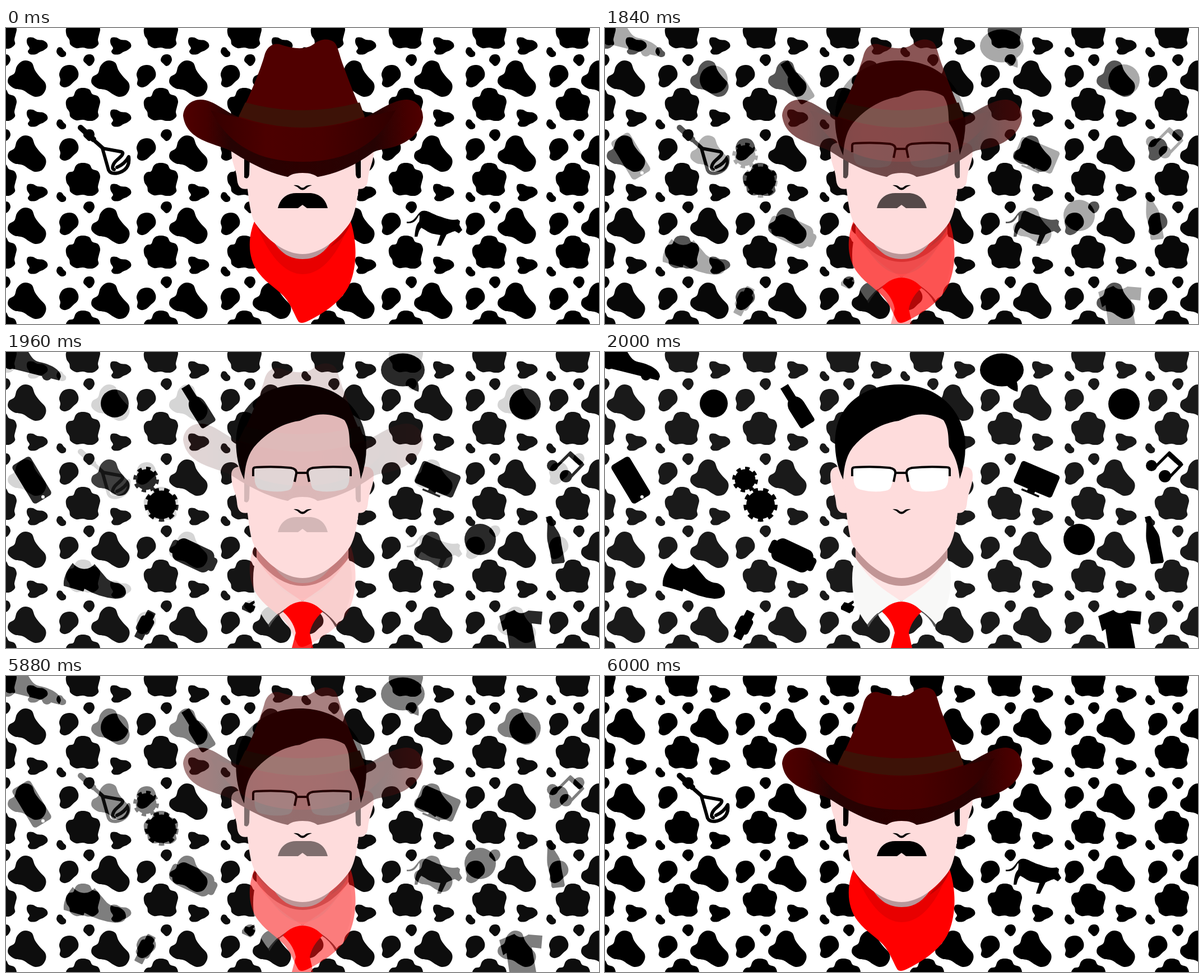
Recreate the animation shown at these times as an HTML page. Size 1058 px wide and 529 px high, loop 6100 ms.

```html
<!DOCTYPE html>
<html lang="en">
<head>
<meta charset="utf-8">
<title>Cowboy and clerk</title>
<style>
  html, body { margin: 0; width: 100%; height: 100%; overflow: hidden; background: #fff; }
  svg { display: block; width: 100%; height: 100%; }
</style>
</head>
<body>
<svg viewBox="0 0 1058 529" preserveAspectRatio="none">
  <defs>
    <linearGradient id="brim" gradientUnits="userSpaceOnUse" x1="316" x2="744" y1="150" y2="150">
      <stop offset="0" stop-color="#500000"/>
      <stop offset=".1" stop-color="#430000"/>
      <stop offset=".2" stop-color="#260303"/>
      <stop offset=".5" stop-color="#2c0000"/>
      <stop offset=".8" stop-color="#260303"/>
      <stop offset=".93" stop-color="#450000"/>
      <stop offset="1" stop-color="#500000"/>
    </linearGradient>
    <linearGradient id="front" gradientUnits="userSpaceOnUse" x1="365" x2="695" y1="190" y2="190">
      <stop offset="0" stop-color="#350000"/>
      <stop offset=".3" stop-color="#4c0000"/>
      <stop offset=".6" stop-color="#480000"/>
      <stop offset="1" stop-color="#300000"/>
    </linearGradient>

    <path id="ear" d="M430,206C410,202 402,208 402,220C402,240 410,250 412,268C413,285 420,290 434,287z"/>
    <path id="sideburn" d="M425,228V267Q432,272 434,262L435,228z"/>
    <g id="face">
      <g fill="#fedcdc">
        <use href="#ear"/>
        <use href="#ear" transform="matrix(-1 0 0 1 1058 0)"/>
        <path d="M428,190C430,130 470,95 530,95C595,95 630,130 631,190L630,280C626,312 622,338 611,352C590,380 560,404 529,404C498,404 468,380 447,352C436,338 434,312 430,280z"/>
      </g>
    </g>
    <path id="nostrils" d="M513,281Q521,280 525,284Q529,287 533,284Q537,280 546,281Q539,283 535,287Q529,292 523,287Q519,283 513,281z"/>
    <g id="lens">
      <path fill="#fff" d="M442,208Q480,205 510,208Q518,211 516,220L511,239Q509,247 500,248Q480,252 456,246Q446,244 444,232z"/>
      <path fill="none" stroke="#000" stroke-width="4" d="M441,222V210Q441,206 446,206Q480,204 508,207Q519,209 518,217L515,232"/>
    </g>
  </defs>

  <g id="cowboy">
    <rect width="1058" height="529" fill="#fff"/>
    <g class="spots"></g>

    <!-- branding iron -->
    <g fill="none" stroke="#000" stroke-linecap="round" stroke-linejoin="round">
      <path stroke-width="10" d="M133,178L156,199"/>
      <path stroke-width="7" d="M154,198L172,214"/>
      <path stroke-width="6" d="M172,215L183,254Q187,262 200,259Q222,253 219,230Q212,243 198,249M172,215L205,221C213,223 205,230 198,236C190,243 188,252 193,253"/>
    </g>
    <!-- cow -->
    <path d="M715,346C730,348 732,332 742,327C752,324 760,333 775,337C788,342 798,344 806,342L810,345L809,352L814,361L808,367L801,363C797,364 790,367 786,369L776,389L769,389L775,370C765,369 755,367 748,361L741,357C736,362 736,368 734,373L729,373C730,362 731,352 737,346C738,340 738,335 737,334C732,344 728,350 715,349z"/>

    <!-- bandanna -->
    <path fill="#f00" d="M443,346C431,376 431,412 451,438C466,458 488,468 501,486C512,502 516,516 522,525Q527,530 540,523C574,506 602,485 614,456C625,428 628,388 615,346z"/>
    <path fill="#e80000" d="M447,352C466,400 494,440 529,440C566,440 594,400 612,350z"/>
    <path fill="#c40000" d="M443,346L447,352Q462,374 482,388L476,382Q455,372 443,346zM615,346Q609,373 578,392L590,377Q606,360 615,346z"/>
    <path fill="#b8989b" d="M475,378C488,400 504,413 529,413C554,413 570,400 583,378z"/>
    <use href="#face"/>
    <use href="#sideburn"/>
    <use href="#sideburn" transform="matrix(-1 0 0 1 1058 0)"/>
    <path d="M485,322C489,304 502,295 518,295H541C557,295 570,304 574,322H537L529,316L521,322z"/>

    <!-- hat -->
    <path fill="url(#brim)" d="M316,157C317,140 330,128 347,128C372,128 392,152 418,160H640C662,150 690,128 715,128C732,128 744,142 744,160C742,183 722,204 690,213C672,218 664,217 655,222C630,241 596,259 557,266H502C468,259 432,240 403,221C378,206 322,204 316,157z"/>
    <path fill="url(#front)" d="M365,147C398,210 450,239 529,239C610,239 664,207 695,147Q665,154 640,160L529,176L418,160Q394,157 365,147z"/>
    <path fill="#500000" d="M415,160C431,130 455,74 462,46C468,30 480,26 491,30C512,37 535,40 550,28C561,19 576,18 585,25C593,32 594,49 604,73C616,106 628,136 640,160Q529,197 415,160z"/>
    <path fill="#3d1207" d="M427,133Q529,161 631,133L640,158Q529,198 415,158z"/>
    <path fill="#fedcdc" d="M500,269C506,262 515,259 529,259C543,259 552,262 559,269z"/>
    <use href="#nostrils"/>
  </g>

  <g id="clerk" opacity="0">
    <rect width="1058" height="529" fill="#fff"/>
    <g class="spots" fill="#1a1a1a"></g>

    <!-- car, bottle, speech bubble, plain badges -->
    <path d="M0,0H40C46,10 50,16 60,18C80,22 98,32 98,44L95,51L60,42L0,27z"/>
    <circle cx="73" cy="42" r="9"/>
    <circle cx="7" cy="21" r="10"/>
    <circle cx="194" cy="92" r="25"/>
    <circle cx="926" cy="93" r="28"/>
    <circle cx="846" cy="335" r="28"/>
    <path transform="translate(342 97) rotate(-32)" d="M-8,-42H8V-16Q15,-10 15,0V34Q15,39 10,39H-10Q-15,39 -15,34V0Q-15,-10 -8,-16z"/>
    <ellipse cx="708" cy="32" rx="39" ry="29.5"/>
    <path d="M715,58Q724,68 736,71Q738,62 733,48z"/>

    <!-- phone, gears, headset -->
    <rect x="-19" y="-40" width="38" height="80" rx="6" transform="translate(46 229) rotate(-31)"/>
    <circle cx="66" cy="259" r="3" fill="#fff"/>
    <g stroke="#000">
      <circle cx="250" cy="228" r="18.5" stroke-width="9" pathLength="16" stroke-dasharray="1"/>
      <circle cx="277.5" cy="273" r="25.5" stroke-width="10" pathLength="18" stroke-dasharray="1"/>
    </g>
    <g transform="translate(334 364) rotate(25)">
      <rect x="-36" y="-22" width="72" height="43" rx="13"/>
      <rect x="-44" y="-13" width="88" height="25" rx="6"/>
    </g>

    <!-- shoe, watch, screen -->
    <path d="M119,377C130,391 148,391 158,379L180,405Q188,412 200,413Q214,418 214,430Q213,441 195,441Q165,438 140,423L138,428L103,418Q101,400 119,377z"/>
    <g transform="translate(248 488) rotate(27)">
      <rect x="-8" y="-27" width="16" height="54" rx="2"/>
      <rect x="-13" y="-15" width="26" height="30" rx="6"/>
    </g>
    <g transform="translate(770 228) rotate(23)">
      <rect x="-37" y="-22" width="74" height="43" rx="5"/>
      <rect x="-18" y="24.5" width="34" height="3.5" rx="1"/>
      <rect x="-8" y="20" width="14" height="5"/>
    </g>

    <!-- notes, bottle, thumb, shirt -->
    <circle cx="975" cy="203" r="10"/>
    <circle cx="999" cy="222" r="11"/>
    <g fill="none" stroke="#000" stroke-linejoin="round">
      <path stroke-width="5" d="M981,206L1007,180L1029,201L1005,226"/>
      <path stroke-width="9" d="M1006,182L1027,201"/>
    </g>
    <path d="M963,295L973,293L976,306C980,316 989,323 990,335C991,348 995,360 997,374L995,377L975,379L973,376C973,362 969,354 967,342C964,332 966,317 966,306z"/>
    <path d="M421,455L427,447L434,449L443,444L444,448L440,452L445,455L442,463L436,467L421,460z"/>
    <path d="M880,472L907,461Q918,472 932,462L957,464L955,487L938,485L946,529H898L893,495L887,499z"/>

    <!-- neck, collar, tie -->
    <path fill="#fee4e4" d="M447,345H611V380Q580,425 529,447Q478,425 447,380z"/>
    <path fill="#c19595" d="M447,345H611V369C590,396 562,418 529,418C496,418 468,396 447,369z"/>
    <g id="collar">
      <path fill="#555" d="M529,444C510,448 483,468 467,486L470,492Q480,472 498,462z"/>
      <path fill="#f8f8f7" d="M447,368C474,412 500,426 529,446C502,452 481,468 468,487C449,464 441,438 441,405Q441,384 447,368z"/>
    </g>
    <use href="#collar" transform="matrix(-1 0 0 1 1058 0)"/>
    <path fill="#f00" d="M494,464Q508,447 529,446Q551,447 565,464Q546,481 542,502L548,529H510L517,502Q513,481 494,464z"/>

    <use href="#face"/>
    <path d="M425,228C411,200 408,165 412,141C420,90 468,58 524,58C592,58 634,100 642,152Q646,190 633,227C630,200 624,185 614,170C612,152 614,138 604,122C586,111 562,108 541,116L524,123C492,127 464,146 446,166C432,181 427,200 425,228z"/>
    <use href="#lens"/>
    <use href="#lens" transform="matrix(-1 0 0 1 1056 0)"/>
    <path stroke="#000" stroke-width="4" d="M517,216H539"/>
    <use href="#nostrils"/>
  </g>
</svg>

<script>
const PERIOD = 437;

// Hide patterns: outline points, then the columns and rows each blob repeats on.
const blobs = [
  ["32,0 43,4 49,18 58,30 67,40 68,51 61,62 49,65 38,60 27,53 12,50 1,41 2,30 12,23 16,11 23,3",
    [3, 152, 291], [58, 192, 321, 455]],
  ["32,0 42,3 47,11 57,15 61,24 59,34 57,43 58,51 50,58 40,59 30,57 18,58 8,52 6,43 1,35 0,24 5,17 13,15 17,6 23,1",
    [107, 246, 395], [-22, 107, 241, 371, 505]],
  ["18,0 28,3 34,13 33,23 25,31 17,38 8,40 1,35 2,26 0,16 6,4",
    [95, 233, 383], [66, 197, 330, 464]],
  ["3,1 11,1 19,5 29,6 36,11 37,18 30,24 23,27 16,31 6,31 2,26 5,20 1,13 0,6",
    [37, 186, 325], [16, 145, 278, 408]],
  ["3,1 9,1 13,6 17,10 16,16 9,18 3,14 0,8",
    [90, 383], [34, 163, 293, 426]],
  ["10,0 17,2 20,10 16,18 10,21 5,17 0,11 3,3",
    [138, 276, 425], [47, 181, 310, 444]]
];

// Centres of the blobs that give way to icons.
const gaps = {
  cowboy: "186,225 760,354",
  clerk: "-12,8 55,32 98,43 186,91 325,91 911,91 37,225 762,225 325,354 911,488 " +
    "713,8 276,271 137,400 205,424 250,218 986,218 837,350 986,350 250,484 " +
    "723,57 1021,191 872,320 434,454"
};

const parse = s => s.split(" ").map(p => p.split(",").map(Number));

// Smooth closed curve through the points.
function smooth(pts) {
  const n = pts.length, at = i => pts[(i + n) % n];
  const handle = (p, a, b, s) => p.map((v, k) => v + s * (b[k] - a[k]) / 6);
  return "M" + pts[0] + pts.map((p, i) => {
    const q = at(i + 1);
    return "C" + [handle(p, at(i - 1), q, 1), handle(q, p, at(i + 2), -1), q].join(" ");
  }).join("") + "z";
}

function spots(gapList) {
  const holes = parse(gapList);
  let out = "";
  for (const [outline, cols, rows] of blobs) {
    const pts = parse(outline), d = smooth(pts);
    const [w, h] = [0, 1].map(k => Math.max(...pts.map(p => p[k])));
    for (let shift = -PERIOD; shift < 1058; shift += PERIOD)
      for (const col of cols)
        for (const y of rows) {
          const x = col + shift;
          if (holes.some(([hx, hy]) => Math.hypot(x + w / 2 - hx, y + h / 2 - hy) < 14)) continue;
          out += `<path d="${d}" transform="translate(${x} ${y})"/>`;
        }
  }
  return out;
}

for (const id in gaps)
  document.querySelector(`#${id} .spots`).innerHTML = spots(gaps[id]);

const clerk = document.getElementById("clerk");

// Six-step fade, 40 ms a step.
const fade = (t, start) => Math.min(1, Math.max(0, (Math.floor((t - start) / 40) + 1) / 6));

function draw() {
  const t = performance.now() % 6100;
  clerk.setAttribute("opacity", fade(t, 1800) - fade(t, 5800));
  requestAnimationFrame(draw);
}
draw();
</script>
</body>
</html>
```
